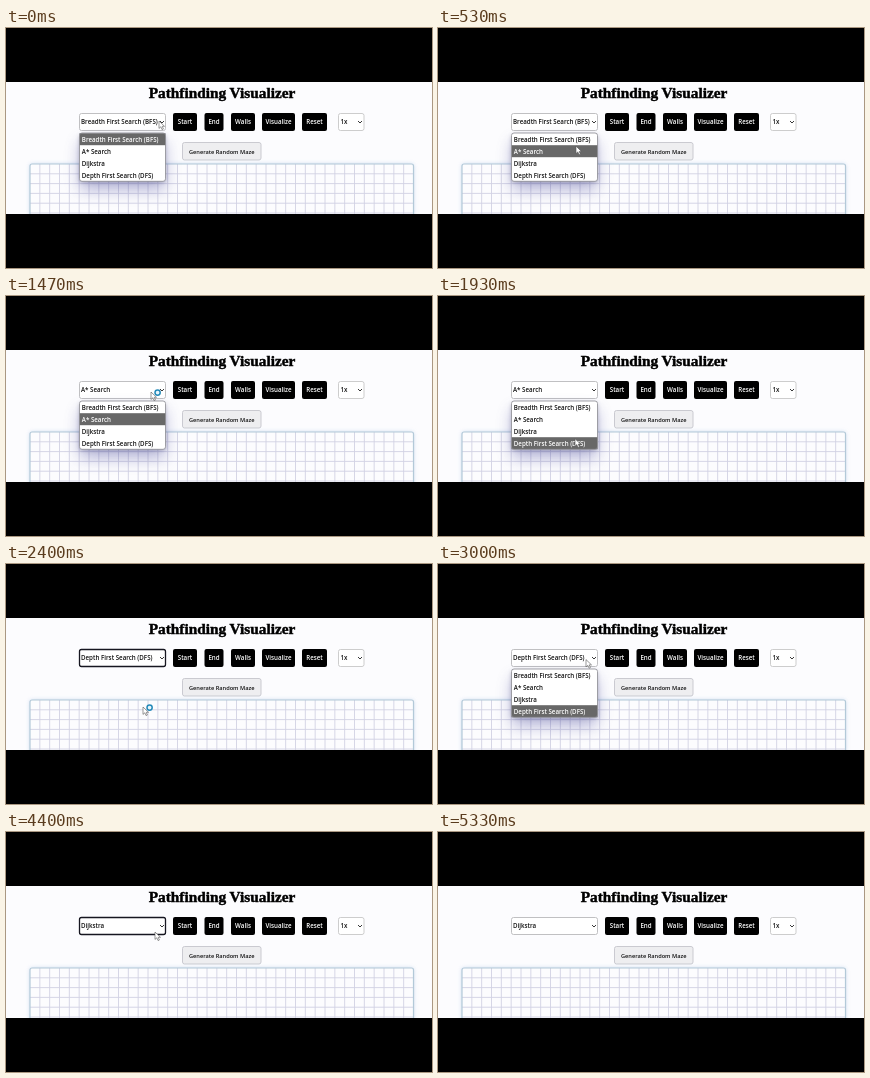
Animation of 426 by 240 pixels, one loop 5.39 s. Source, as an HTML page:

```html
<!DOCTYPE html>
<html lang="en">
<head>
<meta charset="utf-8">
<title>Pathfinding Visualizer</title>
<style>
html, body { margin: 0; width: 100%; height: 100%; overflow: hidden; background: #000; }
svg { display: block; width: 100vw; height: 100vh; }
text { font: 600 6.2px "Open Sans", "Noto Sans", sans-serif; fill: #111; }
.title { font: bold 15.3px "Liberation Serif", serif; fill: #000; stroke: #000; stroke-width: .45; }
.mid { text-anchor: middle; }
text.light { fill: #fff; }
.chevron { fill: none; stroke: #222; stroke-width: .9; }
</style>
</head>
<body>
<svg viewBox="0 0 426 240">
  <defs>
    <clipPath id="page"><rect y="54" width="426" height="132"/></clipPath>
    <filter id="glow" x="-20%" y="-20%" width="140%" height="140%"><feGaussianBlur stdDeviation="2"/></filter>
    <filter id="soft" x="-50%" y="-80%" width="200%" height="260%"><feGaussianBlur stdDeviation="8"/></filter>
  </defs>
  <rect width="426" height="240"/>
  <g clip-path="url(#page)">
    <rect y="54" width="426" height="132" fill="#fcfcfe"/>
    <text class="title mid" x="216" y="69.8">Pathfinding Visualizer</text>
    <g id="controls"></g>
    <g id="board"></g>
    <rect id="box" x="73.5" y="85.5" width="86" height="17" rx="2" fill="#fff"/>
    <text id="value" x="75" y="96.2"></text>
    <path class="chevron" d="M154 93l2 2 2-2"/>
    <g id="menu">
      <rect x="74" y="114" width="85" height="48" rx="3" fill="#5050a0" opacity=".42" filter="url(#soft)"/>
      <rect x="73.5" y="107" width="86" height="47" rx="3" fill="#404060" opacity=".35" filter="url(#glow)"/>
      <rect x="73.5" y="105" width="86" height="48.3" rx="2.5" fill="#fff"/>
      <rect id="mark" x="73.5" width="86" height="12" fill="#686868"/>
      <g id="items"></g>
      <rect x="73.5" y="105" width="86" height="48.3" rx="2.5" fill="none" stroke="#8c8c92" stroke-width=".8"/>
    </g>
    <g id="cursor">
      <path d="M0 0V7.4L1.8 5.8 3.1 8.6 4.4 8 3.2 5.3H5.5Z" fill="#fff" stroke="#555" stroke-width=".6"/>
      <circle id="busy" cx="6.6" cy=".6" r="2.6" fill="#e8f6fc" stroke="#2389b8" stroke-width="1.5"/>
    </g>
  </g>
</svg>
<script>
const $ = id => document.getElementById(id);
const LOOP = 5390, STEP = 200 / 3, ROW = 12, TOP = 105.2;
const names = ["Breadth First Search (BFS)", "A* Search", "Dijkstra", "Depth First Search (DFS)"];

function add(parent, tag, attrs, text) {
  const el = document.createElementNS("http://www.w3.org/2000/svg", tag);
  for (const key in attrs) el.setAttribute(key, attrs[key]);
  if (text) el.textContent = text;
  parent.append(el);
  return el;
}

function button(label, x, width) {
  add($("controls"), "rect", { x, y: 85, width, height: 18, rx: 2, fill: "#000" });
  add($("controls"), "text", { x: x + width / 2, y: 96.2, class: "mid light" }, label);
}
button("Start", 167, 24);
button("End", 198.5, 19);
button("Walls", 225, 24);
button("Visualize", 256, 33);
button("Reset", 296, 25);

const controls = $("controls");
add(controls, "rect", { x: 332.5, y: 85.5, width: 25.5, height: 17, rx: 2, fill: "#fff", stroke: "#c8c8c8", "stroke-width": .9 });
add(controls, "text", { x: 334.5, y: 96.2 }, "1x");
add(controls, "path", { class: "chevron", d: "M352 93l2 2 2-2" });
add(controls, "rect", { x: 176.5, y: 114.5, width: 78.5, height: 17.5, rx: 2, fill: "#eeeef0", stroke: "#c6c6cc", "stroke-width": .9 });
add(controls, "text", { x: 215.7, y: 125.9, class: "mid", style: "font-size:5.65px" }, "Generate Random Maze");

const frame = { x: 24, y: 136, width: 383.5, height: 90, rx: 2 };
add($("board"), "rect", { ...frame, fill: "#aac6e6", opacity: .7, filter: "url(#glow)" });
add($("board"), "rect", { ...frame, fill: "#fcfcfe" });
let lines = "";
for (let i = 1; i < 39; i++) lines += `M${(24 + i * 383.5 / 39).toFixed(2)} 136V190`;
for (let i = 1; i < 6; i++) lines += `M24 ${(136 + i * 9.8).toFixed(2)}H407.5`;
add($("board"), "path", { d: lines, stroke: "#d2d2e4", "stroke-width": .9 });
add($("board"), "rect", { ...frame, fill: "none", stroke: "#b3c9d8", "stroke-width": 1.2 });

const items = names.map((name, i) =>
  add($("items"), "text", { x: 75.8, y: TOP + ROW * i + 8.4 }, name));

// time, x, y of the pointer
const path = [
  [0, 153, 93], [130, 153, 94], [460, 138, 118], [780, 138, 119], [1180, 145, 96],
  [1500, 145, 96], [1950, 137, 143], [2450, 137, 143], [2850, 148, 95], [3120, 148, 96],
  [3500, 133, 135], [3850, 133, 135], [4250, 149, 100], [4450, 149, 100], [5150, 170, 192], [LOOP, 170, 192]
];
// time of change, chosen entry, menu open, focus ring
const states = [
  [0, 0, true, false], [800, 1, false, true], [1270, 1, true, false],
  [2200, 3, false, true], [2950, 3, true, false], [3870, 2, false, true], [4930, 2, false, false]
];

function pointer(t) {
  const i = Math.max(1, path.findIndex(p => p[0] > t));
  const [t0, x0, y0] = path[i - 1], [t1, x1, y1] = path[i];
  const u = (t - t0) / (t1 - t0), e = u * u * (3 - 2 * u);
  return [x0 + (x1 - x0) * e, y0 + (y1 - y0) * e];
}

function draw(now) {
  const t = Math.floor((now % LOOP) / STEP + .05) * STEP;
  const [, chosen, open, focus] = states.findLast(s => s[0] <= t);
  const [x, y] = pointer(t);
  const row = Math.floor((y - TOP) / ROW);
  const hover = row < 0 ? chosen : Math.min(3, row);

  $("value").textContent = names[chosen];
  $("box").setAttribute("stroke", focus ? "#161620" : "#b9b9bc");
  $("box").setAttribute("stroke-width", focus ? 1.3 : .9);
  $("menu").style.display = open ? "" : "none";
  $("mark").setAttribute("y", TOP + ROW * hover);
  items.forEach((item, i) => item.classList.toggle("light", i === hover));
  $("cursor").setAttribute("transform", `translate(${x.toFixed(2)} ${y.toFixed(2)})`);
  const waiting = (t >= 1330 && t < 1600) || (t >= 2200 && t < 2560);
  $("busy").style.display = waiting ? "" : "none";
}

function tick() {
  draw(performance.now());
  requestAnimationFrame(tick);
}
tick();
</script>
</body>
</html>
```
